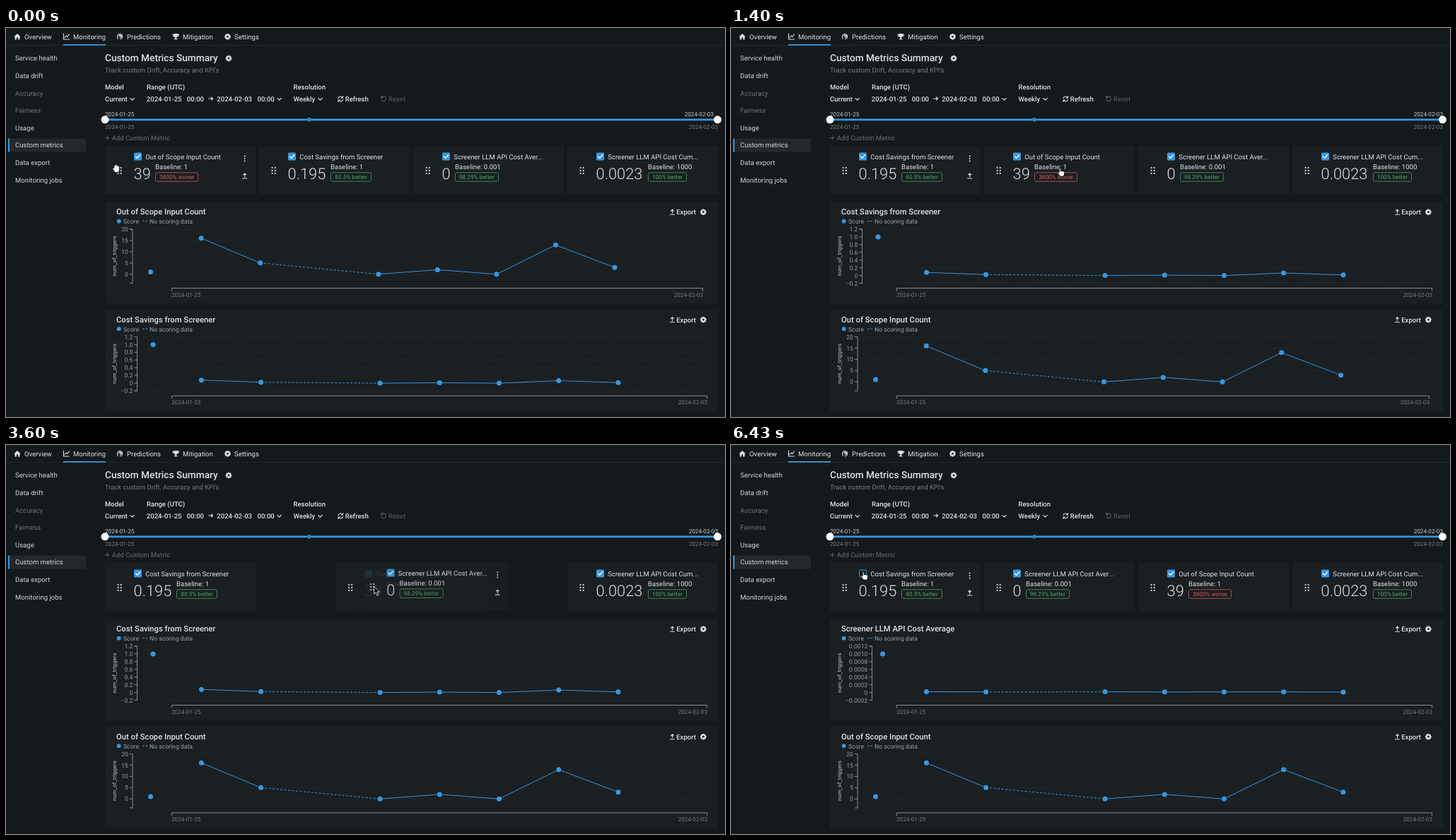
An HTML page that plays this animation: 1017x551 px, repeating every 7.1 s.

```html
<!DOCTYPE html>
<html lang="en">
<head>
<meta charset="utf-8">
<title>Custom metrics</title>
<style>
  html, body { margin: 0; width: 100%; height: 100%; overflow: hidden; background: #14191b; }
  svg { display: block; font: 9.55px Roboto, sans-serif; text-rendering: geometricPrecision; }
  text { fill: #dfe2e3; white-space: pre; }
  .b { font-weight: 500; }
  .line { fill: none; stroke: #dfe2e3; stroke-width: 1.1; stroke-linecap: round; stroke-linejoin: round; }
  .axis { fill: none; stroke: #858b8e; stroke-width: 1; }
  .grid { stroke: #262c2f; stroke-width: 1; stroke-dasharray: 2 2; }
  .plot { fill: none; stroke: #3391dd; stroke-width: 1; }
</style>
</head>
<body>
<svg id="stage" width="1017" height="551" viewBox="0 0 1017 551">
  <g id="shell"></g>
  <g id="charts"><g></g><g transform="translate(0 152.5)"></g></g>
  <g id="cards"></g>
  <g id="tip" display="none">
    <path d="M250 170h12l-6 4z" fill="#2c3235"/>
    <rect x="193.5" y="146.5" width="119.5" height="23.5" rx="2" fill="#1f2527" stroke="#3a4144"/>
    <text x="202" y="160.6" font-size="8.25">Cost Savings from Screener</text>
  </g>
  <g id="cursor" stroke="#111" stroke-width=".8" stroke-linejoin="round">
    <path d="M-1-5V6l2.6-2.4L3.4 8l1.8-.8L3.5 3H7z" transform="translate(0 3)" fill="#090b0c" stroke="#eee"/>
    <path d="M-2 5.5C-3.5 3-5 1-5.2-.4c0-1 1.2-1 2 .4V-3.6c0-1.5 1.6-1.5 1.8 0V-5c.1-1.4 1.8-1.4 2 0v1c.2-1.2 1.8-1.1 1.9.2v1c.3-1 1.8-.9 1.9.4C4.5 1.5 4.5 3 3.2 5.5z" fill="#fff"/>
    <path d="M-1.5 6C-3 3.8-4.8 2-5 .8c0-1 1.2-1 2.2.2V-4.5c0-1.5 1.8-1.5 1.9 0v3.4c.5-.9 1.6-.7 1.8.2.5-.8 1.6-.5 1.8.3.6-.6 1.7-.3 1.8.8C4.6 2.500 4.300 4 3.400 6z" fill="#fff"/>
  </g>
</svg>
<script>
const LOOP = 7100, PITCH = 218, BLUE = '#3598e4', PANEL = '#1a1f21', DIM = '#6c7376';
const $ = id => document.getElementById(id);

const text = (x, y, s, { size = 9.55, fill = '#dfe2e3', bold, anchor = 'start', weight = bold ? 500 : 400 } = {}) =>
  `<text x="${x}" y="${y}" font-size="${size}" font-weight="${weight}" text-anchor="${anchor}" style="fill:${fill}">${s}</text>`;
const rect = (x, y, w, h, fill, more = '') => `<rect x="${x}" y="${y}" width="${w}" height="${h}" fill="${fill}" ${more}/>`;
const dot = (x, y, r, fill = BLUE) => `<circle cx="${x}" cy="${y}" r="${r}" fill="${fill}"/>`;
const path = (d, cls = 'line', more = '') => `<path d="${d}" class="${cls}" ${more}/>`;
const chevron = x => path(`M${x - 2.7} 99.500l2.7 2.700 2.700-2.700`);
const upload = (x, y) => path(`M${x} ${y + 2}v-5m-2 2l2-2 2 2M${x - 3} ${y + 4}h6`);
const gear = (x, y) => `<g transform="translate(${x} ${y})">` +
  [0, 45, 90, 135].map(a => rect(-1.1, -4.3, 2.2, 8.6, '#dfe2e3', `transform="rotate(${a})"`)).join('') +
  dot(0, 0, 3.2, '#dfe2e3') + dot(0, 0, 1.4, '#14191b') + '</g>';
const turn = (x, flip, color) => path(`M${x - 3 * flip} 98.500a3.400 3.400 0 1 ${flip > 0 ? 1 : 0} ${-.2 * flip} 3M${x - 3.4 * flip} 96v2.700h${2.7 * flip}`, 'line', `style="stroke:${color}"`);

function shell() {
  const nav = [[26, 'Overview'], [95, 'Monitoring'], [171, 'Predictions'], [250, 'Mitigation'], [323, 'Settings']];
  const side = ['Service health', 'Data drift', 'Accuracy', 'Fairness', 'Usage', 'Custom metrics', 'Data export', 'Monitoring jobs'];
  const small = { size: 8.2, fill: '#c6cacc' }, faint = { size: 8.2, fill: '#747b7e' };
  const bold = { bold: 1 };
  return rect(0, 24, 1017, 1, '#22282a') + rect(81, 23, 60, 1.8, BLUE) +
    nav.map(([x, s]) => text(x, 15.8, s)).join('') +
    '<path d="M11.300 12.500L16 8l4.700 4.500h-1.300V16.500h-2.300v-3h-2.200v3h-2.300v-4z" fill="#dfe2e3"/>' +
    path('M81.500 8v8h8M83 13.500l2.200-2.500 1.700 1.500 2.600-3.500') +
    path('M158 15.500v-1.500a3.600 3.600 0 1 1 3.500 1.800M160 12a1.600 1.600 0 1 1 1.600 1.600M161.500 12l2.500-1') +
    '<path d="M237.500 8h5.500v3q-.500 2-2 2.400v1.600h1.600v1.300h-4.700v-1.300h1.600v-1.600q-1.500-.400-2-2.400z" fill="#dfe2e3"/>' +
    path('M237.500 9h-1.500q0 2.500 2 2.700M243 9h1.500q0 2.500-2 2.700') + gear(313.500, 12.300) +
    rect(3, 156.500, 110, 19, '#23292b') + rect(3, 156.500, 2, 19, BLUE) +
    side.map((s, i) => text(13, 46.300 + i * 24.600, s, { fill: i === 2 || i === 3 ? DIM : '#d2d6d7' })).join('') +
    text(140, 46.600, 'Custom Metrics Summary', { size: 13.700, bold: 1 }) + gear(315, 43) +
    text(140, 63.300, "Track custom Drift, Accuracy and KPI's", { size: 9.450, fill: '#747b7e' }) +
    text(140, 87, 'Model', bold) + text(199, 87, 'Range (UTC)', bold) + text(406.500, 87, 'Resolution', bold) +
    text(140, 103.800, 'Current', bold) + chevron(178.700) +
    text(198.800, 103.500, '2024-01-25', bold) + text(255.800, 103.500, '00:00', bold) +
    path('M286.500 100h6m-2.200-2.200l2.200 2.200-2.200 2.200') +
    text(298.300, 103.500, '2024-02-03', bold) + text(355.500, 103.500, '00:00', bold) + chevron(386.600) +
    text(406.500, 104, 'Weekly', bold) + chevron(444.500) +
    path('M470 99.500a3.300 3.300 0 0 1 6-1M476.500 96.500v2.500h-2.500M476.400 101.500a3.300 3.300 0 0 1-6 1M470 104.500v-2.500h2.500') +
    text(479.700, 103.600, 'Refresh', bold) + turn(534, 1, '#596063') + text(541, 103.600, 'Reset', { fill: '#596063' }) +
    text(140, 124.600, '2024-01-25', small) +
    `<g id="sliderEnd">${text(1001, 124.600, '2024-02-03', { ...small, anchor: 'end' })}</g>` +
    text(140, 142.600, '2024-01-25', faint) + text(1007, 142.600, '2024-02-03', { ...faint, anchor: 'end' }) +
    rect(140, 128.500, 867, 2.700, BLUE) + dot(429, 129.800, 2.800, '#2583cf') +
    dot(140, 129.800, 5.500, '#fff') + dot(1006.500, 129.800, 5.500, '#fff') +
    path('M140.800 155.500h5.600m-2.800-2.800v5.600', 'line', 'style="stroke:#565d60"') +
    text(149.700, 158.800, 'Add Custom Metric', { bold: 1, fill: '#565d60' }) +
    rect(140, 246.500, 867, 144, PANEL) + rect(140, 399, 867, 144, PANEL);
}

const metrics = {
  scope: {
    name: 'Out of Scope Input Count', value: '39', baseline: '1', note: '3800% worse', bad: true, shift: 30, badge: 61,
    ticks: ['20', '15', '10', '5', '0'], min: -4, axis: 179, ref: 204.500, refValue: 1, data: [16, 5, 0, 2, 0, 13, 3]
  },
  savings: {
    name: 'Cost Savings from Screener', value: '0.195', baseline: '1', note: '80.5% better', shift: 60, badge: 58,
    ticks: ['1.2', '1.0', '0.8', '0.6', '0.4', '0.2', '0', '−0.2'], min: -.2, axis: 185.500, ref: 208, refValue: 1,
    data: [.08, .025, 0, .01, 0, .065, .015]
  },
  average: {
    name: 'Screener LLM API Cost Average', short: 'Screener LLM API Cost Aver...', value: '0', baseline: '0.001',
    note: '98.29% better', shift: 18, badge: 62, min: -.0002, axis: 199.500, ref: 214.500, refValue: .001,
    ticks: ['0.0012', '0.0010', '0.0008', '0.0006', '0.0004', '0.0002', '0', '−0.0002'],
    data: [2, 1.6, 1.8, 1.4, 1.6, 1.6, 1.2].map(v => v / 1e5)
  },
  total: { short: 'Screener LLM API Cost Cum...', value: '0.0023', baseline: '1000', note: '100% better', shift: 73, badge: 55 }
};

function chart(m, right) {
  const top = 285, bottom = 361.500, max = +m.ticks[0];
  const y = v => top + (max - v) / (max - m.min) * (bottom - top);
  const weeks = [0, 1, 3, 4, 5, 6, 7];
  const points = m.data.map((v, i) => [234.300 + (right - 234) * (weeks[i] + .5) / 9, y(v)]);
  const tick = s => {
    const ty = y(+s.replace('−', '-'));
    return path(`M${m.axis + 9} ${ty}H224M234 ${ty}H${right}`, 'grid') + path(`M${m.axis - 4} ${ty}h4`, 'axis') +
      text(m.axis - 6, ty + 3.100, s, { size: 8.700, fill: '#92989b', anchor: 'end' });
  };
  const date = { size: 8.200, fill: '#747b7e' };
  return text(156, 264, m.name, { size: 11.250, bold: 1 }) +
    dot(159.700, 273.700, 2.900) + text(166, 277, 'Score', { size: 8.650, fill: '#9ba1a3' }) +
    path('M193 273.700h2.900m1.300 0h2.900', 'plot') + text(203, 277, 'No scoring data', { size: 8.650, fill: '#9ba1a3' }) +
    upload(942.500, 260.200) + text(948.200, 264, 'Export', { bold: 1 }) + gear(986.300, 260.700) +
    `<g transform="translate(155.800 323) rotate(-90)">${text(0, 0, 'num_of_triggers', { size: 7.800, bold: 1, fill: '#9ba1a3', anchor: 'middle' })}</g>` +
    m.ticks.map(tick).join('') + path(`M${m.axis - 4} ${top}h4V${bottom}h-4`, 'axis') +
    path(`M234.500 372.500v-4H${right - .5}v4`, 'axis') +
    text(234, 380.700, '2024-01-25', date) + text(right, 380.700, '2024-02-03', { ...date, anchor: 'end' }) +
    path(`M${points[0]}L${points[1]}M${points.slice(2).join('L')}`, 'plot') +
    path(`M${points[1]}L${points[2]}`, 'plot', 'stroke-dasharray="3 2.500"') +
    [[m.ref, y(m.refValue)], ...points].map(p => dot(...p, 3.500)).join('');
}

function card(m) {
  const [ink, edge] = m.bad ? ['#d25966', '#a84a54'] : ['#4fa56e', '#3c8557'];
  const x = 181 + m.shift;
  const grip = [198, 202, 206].map(y => dot(158.600, y, 1.150, '#cbcfd0') + dot(162.700, y, 1.150, '#cbcfd0')).join('');
  return rect(140, 167, 213, 68.500, PANEL) + '<rect class="hot" x="150" y="192" width="21" height="21" fill="#121618"/>' + grip +
    `<g class="check">${rect(181, 176.500, 11, 11, BLUE, 'rx="1.500"')}${path('M183.500 182l2.200 2.300 4-4.500', 'line', 'style="stroke:#fff;stroke-width:1.300"')}</g>` +
    `<g class="uncheck" display="none">${rect(181.500, 177, 10, 10, 'none', `rx="1.500" stroke="${BLUE}"`)}</g>` +
    text(197.300, 185.500, m.short || m.name) + text(180.600, 213.700, m.value, { size: 21.850, weight: 300 }) +
    text(x, 200, 'Baseline: ' + m.baseline) +
    rect(x + .5, 204.800, m.badge - 1, 12.500, 'none', `rx="2" stroke="${edge}"`) +
    text(x + m.badge / 2, 214, m.note, { size: 8.200, fill: ink, anchor: 'middle' }) +
    `<g class="tools">${[181.500, 185, 188.500].map(y => dot(337.700, y, 1, '#dfe2e3')).join('')}${upload(337.700, 209)}</g>`;
}

// Rows are [time, ...values], joined by straight segments.
function track(rows, t) {
  const i = rows.findIndex(r => r[0] > t);
  if (i < 0) return rows[rows.length - 1].slice(1);
  if (!i) return rows[0].slice(1);
  const [a, b] = [rows[i - 1], rows[i]], p = (t - a[0]) / (b[0] - a[0]);
  return a.slice(1).map((v, k) => v + (b[k + 1] - v) * p);
}
const latest = (rows, t) => rows.filter(r => r[0] <= t).pop().slice(1);
const glide = (t, start, from, to) => {
  const p = Math.min(1, Math.max(0, (t - start) / 200));
  return from + (to - from) * (1 - (1 - p) ** 3);
};

const pointer = [[30, 156, 199], [600, 405, 203.500], [700, 440, 204], [860, 467, 204], [1800, 467, 204],
  [2500, 592, 203], [2860, 600, 203], [3300, 600, 203], [3960, 428, 201], [4830, 428, 201], [5230, 203, 186], [5500, 189, 185]];
const shapes = [[0, 1], [60, 0], [800, 2], [2500, 1], [3340, 0], [3980, 1], [4900, 2]];
const plots = [[0, 'scope', 986, 'savings', 992], [1300, 'savings', 992, 'scope', 986], [1400, 'savings', 992, 'scope', 988],
  [1560, 'savings', 992, 'scope', 992], [4030, 'savings', 992, 'average', 992], [6400, 'average', 992, 'scope', 992]];
const drags = [
  { key: 'scope', start: 30, drop: 760, end: 860, from: 0, to: 1 },
  { key: 'average', start: 3300, drop: 3960, end: 4030, from: 2, to: 1 }
];

$('shell').innerHTML = shell();
const cards = {};
for (const key in metrics) {
  const g = document.createElementNS('http://www.w3.org/2000/svg', 'g');
  g.innerHTML = card(metrics[key]);
  $('cards').append(g);
  cards[key] = g;
}
const show = (el, on) => el.setAttribute('display', on ? 'inline' : 'none');
const chartKeys = [];

function render(t) {
  const [cx, cy] = track(pointer, t);
  const place = {
    scope: [t < 860 ? 0 : glide(t, 3560, PITCH, 2 * PITCH), 0],
    savings: [glide(t, 290, PITCH, 0), 0],
    average: [(t < 4030 ? 2 : 1) * PITCH, 0],
    total: [3 * PITCH, 0]
  };
  const drag = drags.find(d => t >= d.start && t < d.end);
  if (drag) {
    const [sx, sy] = track(pointer, drag.start), [px, py] = track(pointer, Math.min(t, drag.drop));
    const settle = Math.max(0, (t - drag.drop) / (drag.end - drag.drop));
    const x = drag.from * PITCH + px - sx;
    place[drag.key] = [x + (drag.to * PITCH - x) * settle, (py - sy) * (1 - settle)];
    if ($('cards').lastChild !== cards[drag.key]) $('cards').append(cards[drag.key]);
  }
  const hover = t < 1800 ? 0 : t >= 3300 && t < 4000 ? 2 : Math.floor((cx - 140) / PITCH);
  for (const key in cards) {
    const g = cards[key], [x, y] = place[key], held = drag && drag.key === key;
    g.setAttribute('transform', `translate(${x} ${y})`);
    g.setAttribute('opacity', held ? .88 : 1);
    show(g.querySelector('.tools'), held || Math.abs(x - hover * PITCH) < 60);
    show(g.querySelector('.hot'), key === 'average' && t > 2500 && t < 3300);
  }
  const off = t >= 6330;
  show(cards.savings.querySelector('.check'), !off);
  show(cards.savings.querySelector('.uncheck'), off);

  const [a, aRight, b, bRight] = latest(plots, t);
  [[a, aRight], [b, bRight]].forEach(([key, right], i) => {
    if (chartKeys[i] === key + right) return;
    chartKeys[i] = key + right;
    $('charts').children[i].innerHTML = chart(metrics[key], right);
  });
  $('sliderEnd').setAttribute('transform', `translate(${t < 1300 ? 0 : 6} 0)`);
  show($('tip'), t >= 5160 && t < 5430);
  $('cursor').setAttribute('transform', `translate(${cx} ${cy})`);
  const [shape] = latest(shapes, t);
  [...$('cursor').children].forEach((el, i) => show(el, i === shape));
}

const began = performance.now();
function tick() {
  render((performance.now() - began) % LOOP);
  requestAnimationFrame(tick);
}
tick();
</script>
</body>
</html>
```
